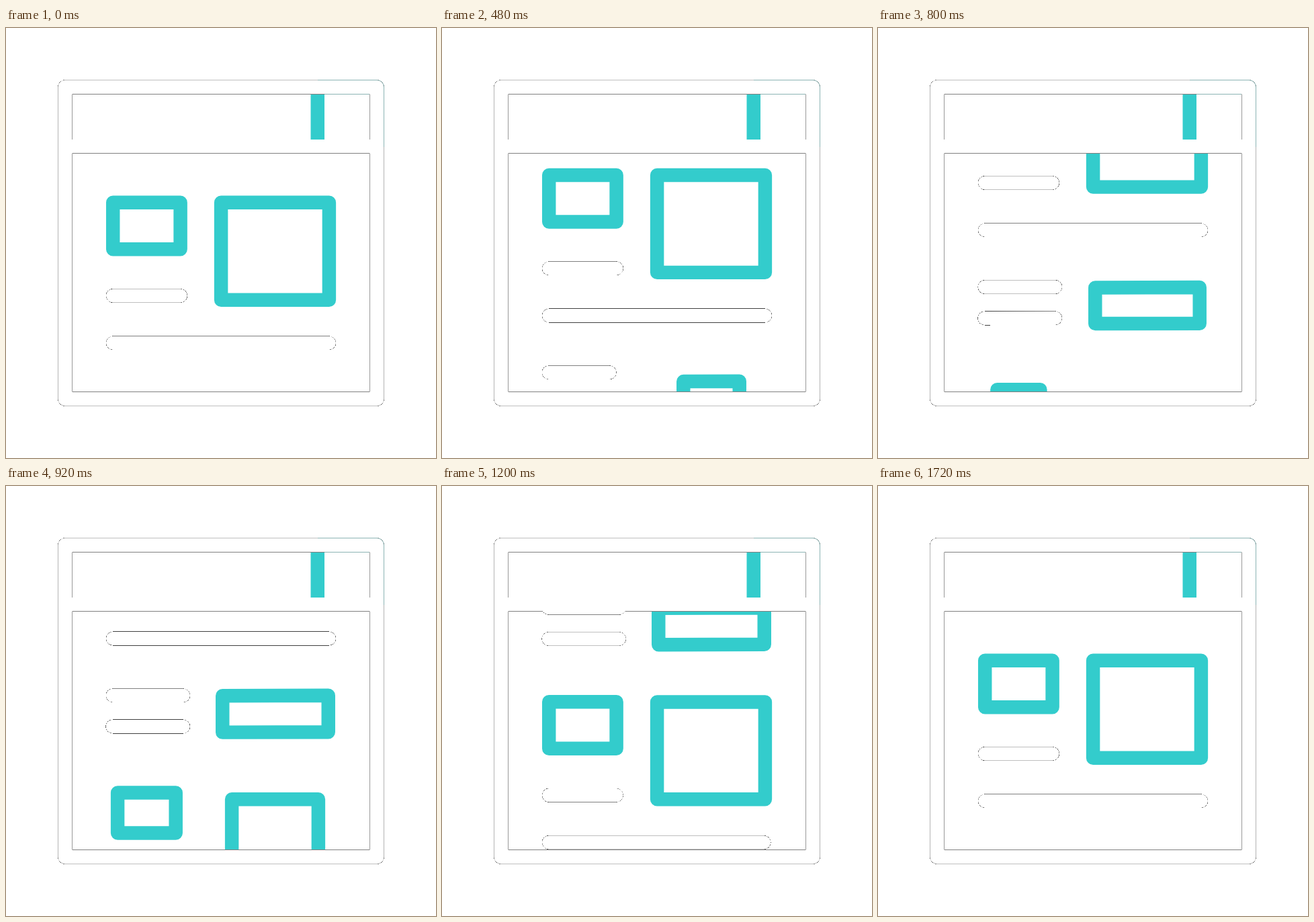
Animation of 640x640 px, one loop 2000 ms. Source, as an HTML page with a canvas:

```html
<!DOCTYPE html>
<html lang="en">
<head>
<meta charset="utf-8">
<title>Scrolling page</title>
<style>
  html, body { margin: 0; width: 100%; height: 100%; overflow: hidden; background: #fff; }
  canvas { display: block; width: 640px; height: 640px; }
</style>
</head>
<body>
<canvas id="stage" width="640" height="640"></canvas>
<script>
const SIZE = 640, LOOP = 2000, STEP = 40;
const START = 40, SCROLL_TIME = 1680, SCROLL = 434;
const TEAL = '#33cccc', TINT = '#8cb4b4';
const STROKE = 20.48, EDGE_CUTOFF = 60;

const stage = document.getElementById('stage').getContext('2d');
const layer = document.createElement('canvas');
layer.width = layer.height = SIZE;
const white = layer.getContext('2d', { willReadFrequently: true });

const clamp = x => Math.min(1, Math.max(0, x));

// Symmetric cubic bezier easing with handles (h, 0) and (1 - h, 1).
function ease(x, h = 0.587) {
  let lo = 0, hi = 1;
  for (let i = 0; i < 30; i++) {
    const u = (lo + hi) / 2, v = 1 - u;
    const bx = 3 * v * v * u * h + 3 * v * u * u * (1 - h) + u * u * u;
    if (bx < x) lo = u; else hi = u;
  }
  return lo * lo * (3 - 2 * lo);
}

const grow = (time, start, duration) => 1 - (1 - clamp((time - start) / duration)) ** 2;

function pen(ctx, color, width = STROKE, cap = 'round') {
  ctx.strokeStyle = color;
  ctx.lineWidth = width;
  ctx.lineCap = cap;
  ctx.lineJoin = 'round';
}

function line(ctx, points, closed) {
  ctx.beginPath();
  points.forEach(([x, y]) => ctx.lineTo(x, y));
  if (closed) ctx.closePath();
  ctx.stroke();
}

// A box that scales about its centre while its stroke stays constant.
function box(cx, cy, w, h, scale, tilt = 0) {
  const dx = w / 2 * scale, dy = h / 2 * scale;
  line(stage, [
    [cx - dx, cy - dy + tilt], [cx + dx, cy - dy - tilt],
    [cx + dx, cy + dy - tilt], [cx - dx, cy + dy + tilt]
  ], true);
}

function pill(x, top, length, scale, slope = 0) {
  const y = top + STROKE / 2;
  line(white, [[x, y], [x + length * scale, y - slope * scale]]);
}

function clipToPage(ctx) {
  ctx.save();
  ctx.beginPath();
  ctx.rect(98, 186, 444, 357);
  ctx.clip();
}

function drawWindow() {
  const a = 87.95, b = SIZE - a, divider = 176.35;
  pen(white, '#fff', 21.3);
  line(white, [[a, a], [b, a], [b, b], [a, b]], true);
  pen(white, '#fff', STROKE, 'butt');
  line(white, [[a, divider], [b, divider]]);
}

// Thin tinted edges around the button in the title bar.
function drawButtonEdges() {
  pen(stage, TINT, 1, 'butt');
  line(stage, [[474, 98.5], [541, 98.5]]);
  stage.beginPath();
  stage.moveTo(464, 77.5);
  stage.arcTo(562.5, 77.5, 562.5, 177, 10.4);
  stage.lineTo(562.5, 177);
  stage.stroke();
}

function drawGallery(y, small, large, short, long) {
  box(209.4, 294.45 + y, 100.4, 69.5, small);
  box(400.5, 332.2 + y, 160.8, 144.9, large);
  pill(159.2, 388.28 + y, 100.4, short);
  pill(159.2, 458.53 + y, 321.6, long);
}

function drawArticle(y, time) {
  box(401, 581.1 + y, 157.5, 54.4, grow(time, 304, 560), 0.2);
  pill(159, 543.28 + y, 104.8, grow(time, 40, 700));
  pill(158.7, 589.72 + y, 105, grow(time, 60, 700), 0.15);
}

// Soft edges are flattened onto black; the faintest ones disappear.
function flattenEdges() {
  const image = white.getImageData(0, 0, SIZE, SIZE), px = image.data;
  for (let i = 0; i < px.length; i += 4) {
    const alpha = px[i + 3];
    if (alpha === 0 || alpha === 255) continue;
    for (let c = 0; c < 3; c++) px[i + c] *= alpha / 255;
    px[i + 3] = alpha < EDGE_CUTOFF ? 0 : 255;
  }
  white.putImageData(image, 0, 0);
}

function draw(time) {
  stage.fillStyle = '#fff';
  stage.fillRect(0, 0, SIZE, SIZE);
  white.clearRect(0, 0, SIZE, SIZE);

  stage.fillStyle = TEAL;
  stage.fillRect(453.5, 98, 20.5, 68);
  drawWindow();

  const y = -SCROLL * ease(clamp((time - START) / SCROLL_TIME));
  clipToPage(stage);
  clipToPage(white);
  pen(stage, TEAL);
  pen(white, '#fff');
  drawGallery(y, 1, 1, 1, 1);
  drawArticle(y, time);
  drawGallery(y + SCROLL,
    grow(time, 593, 520), grow(time, 621, 540),
    grow(time, 662, 540), grow(time, 700, 540));
  stage.restore();
  white.restore();

  flattenEdges();
  stage.drawImage(layer, 0, 0);
  drawButtonEdges();
}

let shown = -1;
function tick() {
  const time = Math.floor(performance.now() % LOOP / STEP) * STEP;
  if (time !== shown) draw(shown = time);
  requestAnimationFrame(tick);
}
tick();
</script>
</body>
</html>
```
